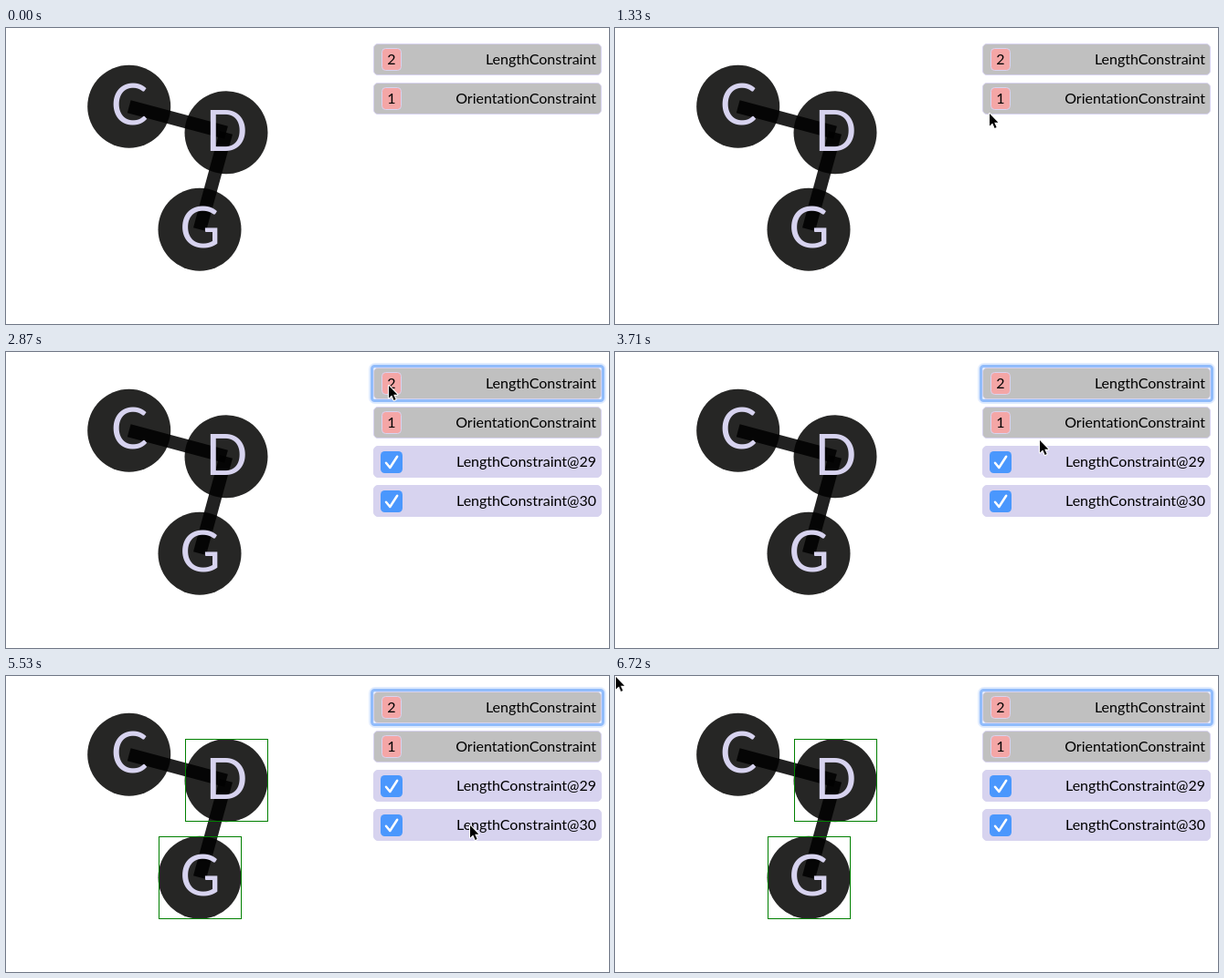
An HTML page that plays this animation: 660 by 325 pixels, repeating every 8000 ms.

```html
<!DOCTYPE html>
<html lang="en">
<head>
<meta charset="utf-8">
<title>Constraint list</title>
<style>
html, body { margin: 0; width: 100%; height: 100%; overflow: hidden; background: #fff; }
svg { display: block; width: 100%; height: 100%; font: 16px Lato, sans-serif; font-variant-ligatures: none; }
.node { font-size: 61px; fill: #d7d3ef; text-anchor: middle; }
.link { stroke: #000; stroke-width: 14.5; stroke-opacity: .87; }
.frame { fill: none; stroke: green; }
.label { text-anchor: end; }
.count { text-anchor: middle; }
#focus rect { fill: none; stroke: #7fb1fb; }
#cursor { stroke: #fff; stroke-width: 2; stroke-linejoin: round; paint-order: stroke; }
</style>
</head>
<body>
<svg viewBox="0 0 660 325">
  <g id="nodes"></g>
  <g id="frames"></g>
  <g id="focus">
    <rect x="400" y="15" width="254" height="39" rx="4" stroke-width="6" stroke-opacity=".25"/>
    <rect x="400.5" y="15.5" width="253" height="38" rx="3" stroke-width="3" stroke-opacity=".8"/>
  </g>
  <g id="rows"></g>
  <path id="cursor" d="M1 1V14.5L4.2 11.5 6.6 17 8.6 16.1 6.2 10.8H10.4Z"/>
</svg>
<script>
const $ = id => document.getElementById(id);
const LOOP = 8000, TICK = 70, RADIUS = 45.5, LAVENDER = '#d7d3ef';

const nodes = [
  { name: 'C', x: 134.7, y: 86.2 },
  { name: 'D', x: 241, y: 114.8 },
  { name: 'G', x: 212, y: 221.2 }
];
const draws = {
  disc: n => `<circle cx="${n.x}" cy="${n.y}" r="${RADIUS}" fill="#262625"/>`,
  link: (n, i) => i ? `<line class="link" x1="${nodes[i - 1].x}" y1="${nodes[i - 1].y}" x2="${n.x}" y2="${n.y}"/>` : '',
  name: n => `<text class="node" x="${n.x + .5}" y="${n.y + 20}">${n.name}</text>`,
  frame: n => `<rect class="frame" x="${Math.floor(n.x - 45) + .5}" y="${Math.floor(n.y - 45) + .5}" width="90" height="90"/>`
};
const each = kind => nodes.map(draws[kind]).join('');
$('nodes').innerHTML = each('disc') + each('link') + each('name');
$('frames').innerHTML = each('frame');

const count = n => `<rect x="9.5" y="5.5" width="21" height="24" rx="4" fill="#f4a6a6" stroke="${LAVENDER}"/>
  <text class="count" x="20" y="23">${n}</text>`;
const check = `<rect x="8" y="6" width="24" height="24" rx="4.5" fill="#4a97fd"/>
  <path d="M14 18.8L18.3 24 26.2 11.8" fill="none" stroke="#fff" stroke-width="2.5" stroke-linecap="round" stroke-linejoin="round"/>`;
const rows = [
  ['LengthConstraint', 2], ['OrientationConstraint', 1],
  ['LengthConstraint@29'], ['LengthConstraint@30']
];
$('rows').innerHTML = rows.map(([label, n], i) => `<g transform="translate(402 ${17 + 43 * i})">
  <rect x=".5" y=".5" width="249" height="34" rx="4.5" fill="${n ? '#c0c0c0' : LAVENDER}" stroke="${LAVENDER}"/>
  ${n ? count(n) : check}<text class="label" x="244" y="23">${label}</text></g>`).join('');

// Places where the pointer comes to rest
const stops = [
  { at: 0, x: 331, y: -17 },
  { at: 840, x: 400, y: 117 },
  { at: 1820, x: 418, y: 36 },
  { at: 3920, x: 468, y: 122 },
  { at: 4270, x: 517, y: 114 },
  { at: 4550, x: 497, y: 111 },
  { at: 5530, x: 507, y: 163 },
  { at: 6090, x: 537, y: 161 },
  { at: 6720, x: 490, y: 156 }
];

// A move takes at most 700 ms; x eases out while y runs evenly, which bends the path.
function pointer(t) {
  const next = stops.findIndex(s => s.at > t);
  const to = stops.at(next), from = next > 0 ? stops[next - 1] : to;
  const start = Math.max(from.at, to.at - 700);
  const k = Math.min(1, Math.max(0, (t - start) / (to.at - start)));
  const mix = (a, b, p) => Math.round(a + (b - a) * p);
  return [mix(from.x, to.x, k * (2 - k)), mix(from.y, to.y, k)];
}

const show = (element, on) => { element.style.display = on ? '' : 'none'; };

function draw(now) {
  const t = Math.floor(now % LOOP / TICK) * TICK;
  $('cursor').setAttribute('transform', `translate(${pointer(t)})`);
  show($('focus'), t >= 2730);
  [...$('rows').children].forEach((row, i) => show(row, i < 2 || t >= 2870));
  // The hovered constraint frames its two nodes.
  const hovered = t >= 5530 ? 1 : 0;
  [...$('frames').children].forEach((frame, i) =>
    show(frame, t >= 4900 && (i === hovered || i === hovered + 1)));
  requestAnimationFrame(draw);
}
draw(0);
</script>
</body>
</html>
```
